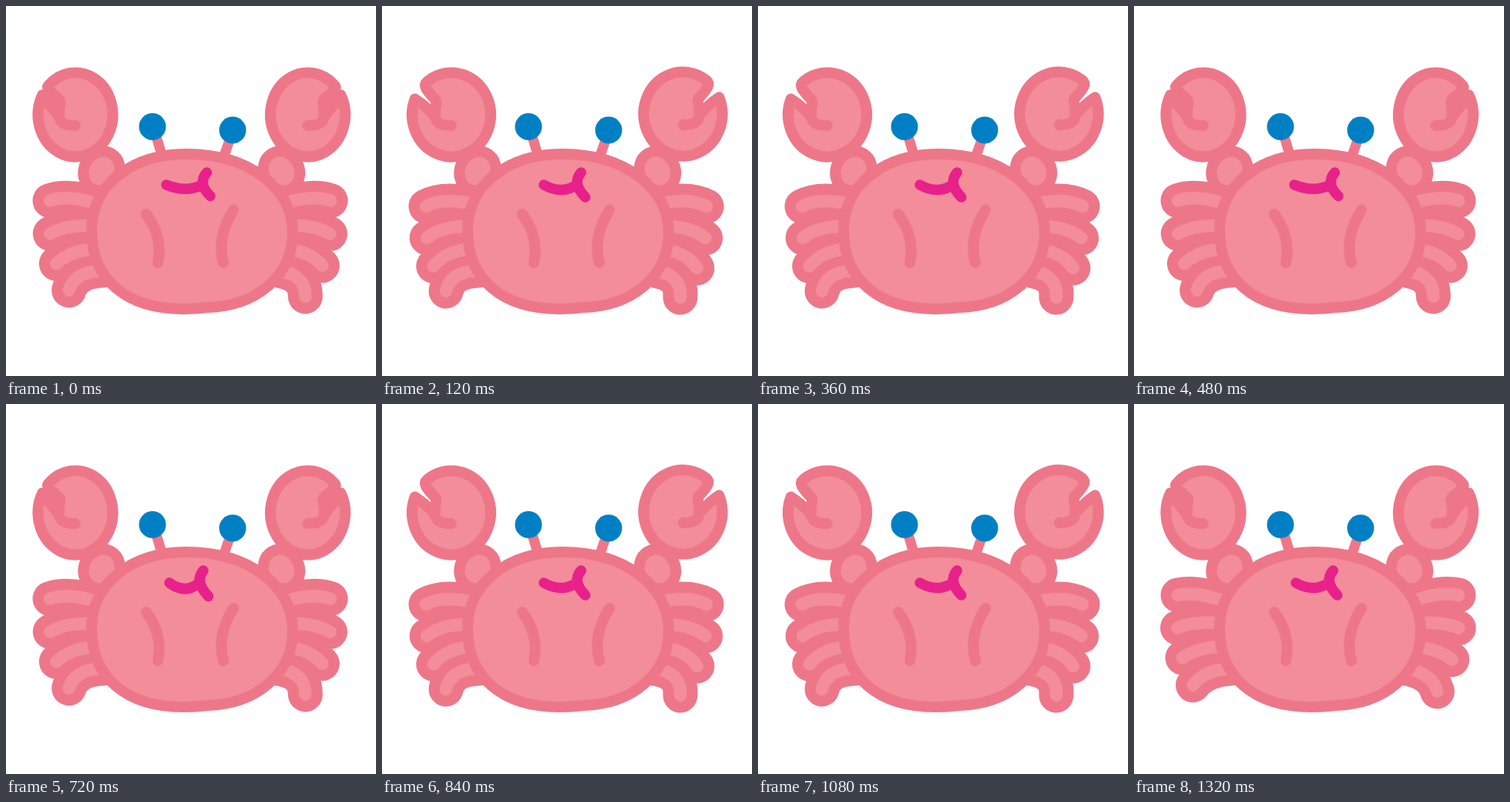
Recreate the animation shown at these times as an HTML page with a canvas. Size 480x480 px, loop 1.44 s.

```html
<!DOCTYPE html>
<html lang="en">
<head>
<meta charset="utf-8">
<title>Crab</title>
<style>
html, body { margin: 0; width: 100%; height: 100%; overflow: hidden; background: #fff; }
canvas { display: block; width: 480px; height: 480px; }
</style>
</head>
<body>
<canvas id="stage" width="480" height="480"></canvas>
<script>
const ctx = document.getElementById('stage').getContext('2d');
const LINE = '#ed7789', SKIN = '#f28d99', EYE = '#0080c4', MOUTH = '#e8218a';
const STEP = 120, STEPS = 12;

const BODY = new Path2D('M111 291C111 233 162 192 234 192C314 192 372 235 372 294' +
  'C372 350 325 389 262 391Q246 393 230 393C156 393 111 355 111 291Z');
const STALKS = new Path2D('M193 163L203 196M292 168L281 200');
const BELLY = new Path2D('M182 270Q204 300 197 333M295 265Q273 300 282 333');

const mix = (a, b, t) => a + (b - a) * t;
const rad = deg => deg * Math.PI / 180;

function stroke(path, color, width) {
  ctx.strokeStyle = color;
  ctx.lineWidth = width;
  ctx.stroke(path);
}

function shape(path) {
  ctx.fillStyle = SKIN;
  ctx.fill(path);
  stroke(path, LINE, 14);
}

function disc(x, y) {
  ctx.fillStyle = EYE;
  ctx.beginPath();
  ctx.arc(x, y, 17.5, 0, Math.PI * 2);
  ctx.fill();
}

// Runs paint with x mirrored to width - x.
function flip(width, paint) {
  ctx.save();
  ctx.translate(width, 0);
  ctx.scale(-1, 1);
  paint();
  ctx.restore();
}

// Four legs fanned down the left side; skew pulls the lower ones outward.
function legs(wave, skew) {
  const path = new Path2D();
  for (let i = 0; i < 4; i++) {
    const drop = wave ** (1.4 - .35 * i);
    const pull = skew * i ** 3;
    path.moveTo(
      57 - 4 * i + 3.5 * i * i + 2.5 * i * drop + pull,
      248 + 44 * i - 1.7 * i * i + (21 - 5 * i) * drop + pull);
    path.quadraticCurveTo(
      84 + .8 * i * i - 3 * drop,
      242 + 38 * i - 1.2 * i * i + (8 - 3 * i) * drop + pull / 2,
      125, 259 + 28 * i);
  }
  stroke(path, LINE, 45);
  stroke(path, SKIN, 16.5);
}

function arm() {
  const path = new Path2D();
  path.ellipse(124, 214, 23, 26, .5, 0, Math.PI * 2);
  shape(path);
}

// An oval whose rim breaks into two tips; opening widens it and parts them.
function claw(open) {
  const cx = 90, cy = 141, rx = 48.5 + 5 * open, ry = 54.5;
  const low = rad(mix(-152, -164, open)), high = rad(mix(-134, -122, open));
  const rim = a => [cx + rx * Math.cos(a), cy + ry * Math.sin(a)];
  const [x, y] = rim(high);
  const path = new Path2D();
  path.moveTo(66, 140);
  path.quadraticCurveTo(56, 129, ...rim(low));
  path.ellipse(cx, cy, rx, ry, 0, low, high, true);
  path.bezierCurveTo(x - 7.5, y + 6.5, 62, 113, 70, 122.5);
  path.bezierCurveTo(72, 132, 58, 156, 90, 155);
  shape(path);
}

function mouth(smile) {
  const joint = mix(253, 249, smile);
  const path = new Path2D();
  path.moveTo(mix(208, 212, smile), 232);
  path.quadraticCurveTo(232, mix(242, 247, smile), joint, 233);
  path.moveTo(mix(260.5, 256, smile), 216);
  path.quadraticCurveTo(joint - 5, 230, mix(265, 262.5, smile), mix(246.5, 249.5, smile));
  stroke(path, MOUTH, 13.5);
}

function draw(step) {
  // legs and claws swing every six steps, the mouth every four
  const wave = 1 - Math.abs(step % 6 - 2) / 3;
  const swing = Math.max(0, wave);
  const open = Math.max(0, 1.5 * swing - .5);
  const smile = (1 - Math.cos(step * Math.PI / 2)) / 2;

  ctx.fillStyle = '#fff';
  ctx.fillRect(0, 0, 480, 480);
  ctx.lineCap = ctx.lineJoin = 'round';

  legs(swing, 0);
  flip(478, () => legs(swing, .3));
  arm();
  claw(open);
  flip(481.5, () => {
    arm();
    ctx.translate(96 - open, 200 - 1.5 * open);
    ctx.rotate(rad(3 * open));
    ctx.translate(-96, -200);
    claw(open);
  });
  stroke(STALKS, LINE, 13);
  shape(BODY);
  stroke(BELLY, LINE, 14);
  disc(190, 156.5);
  disc(294, 161);
  mouth(smile);
}

const start = performance.now();
let shown = -1;
function tick() {
  const step = Math.floor((performance.now() - start) / STEP) % STEPS;
  if (step !== shown) draw(shown = step);
  requestAnimationFrame(tick);
}
tick();
</script>
</body>
</html>
```
